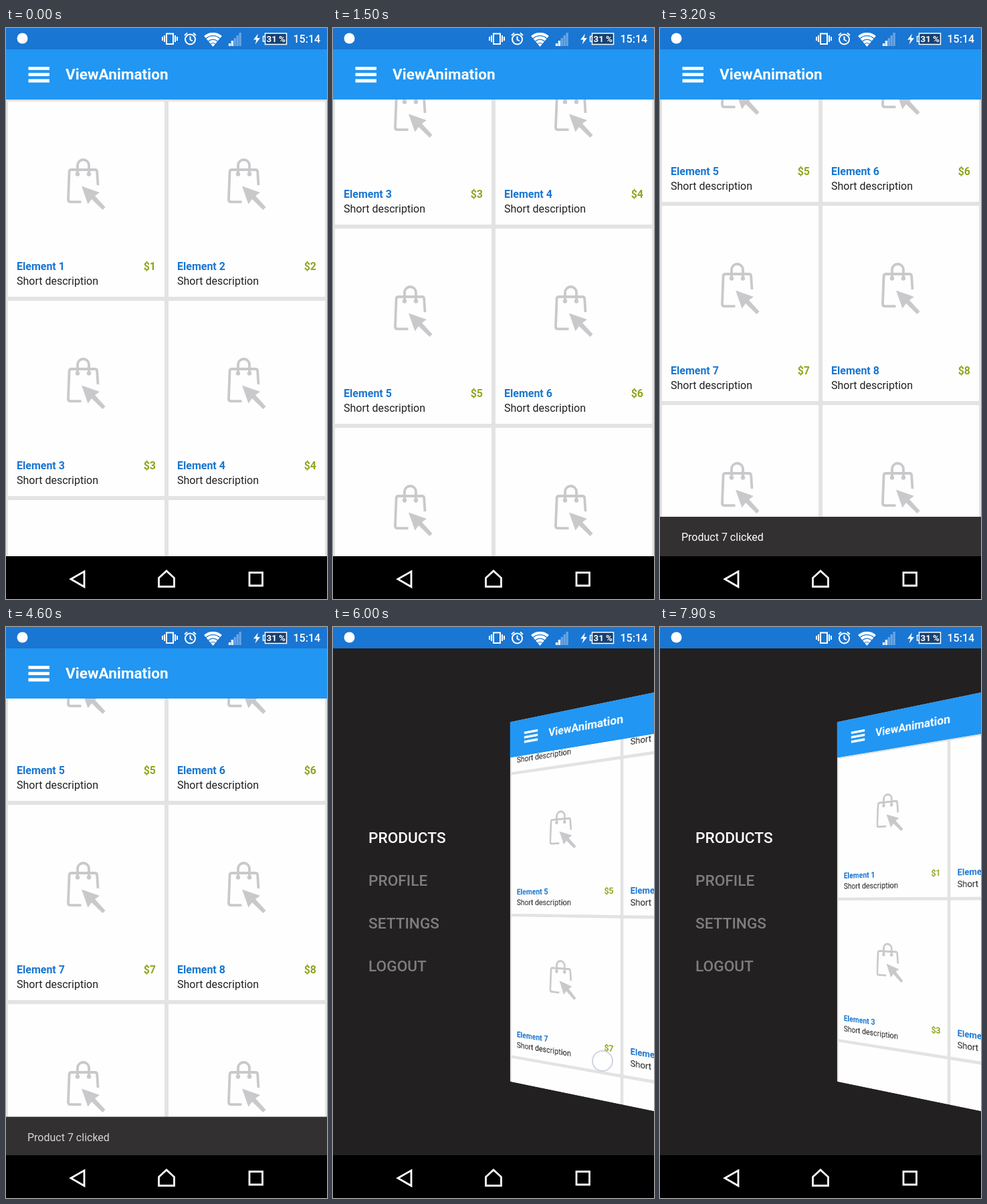
Write an HTML page that moves like this. It is 480x854 px and loops after 8000 ms.

```html
<!DOCTYPE html>
<html lang="en">
<head>
<meta charset="utf-8">
<title>Drawer demo</title>
<style>
@property --open { syntax: "<number>"; inherits: false; initial-value: 0; }

html, body { margin: 0; width: 100%; height: 100%; overflow: hidden; background: #222021; }
#stage {
  --t: 0;
  position: relative; width: 480px; height: 854px; overflow: hidden;
  background: #222021; font: 16px/20px Roboto, sans-serif; color: #212121;
}
#stage * { box-sizing: border-box; }
#stage div, #stage svg { position: absolute; }

/* All motion is scrubbed through --t (milliseconds into the loop). */
.page, .list, .snack, .snack span, .finger, .finger i {
  animation: 8s linear calc(var(--t) * -1ms) infinite paused both;
}

.status { inset: 0 0 auto; height: 32px; background: #1976d2; }
.nav { inset: 790px 0 0; background: #000; }

.menu { left: 53px; top: 284px; font: 500 22.67px/64px Roboto, sans-serif; color: #7f7e7f; }
.menu p { margin: 0; }
.menu p:first-child { color: #fff; }

.page {
  left: 0; top: 32px; width: 480px; height: 758px; overflow: hidden; background: #e3e3e4;
  transform: translateX(calc(var(--open) * 192px)) perspective(286px)
    rotateY(calc(var(--open) * -11deg)) scale(calc(1 - var(--open) * .2));
  animation-name: open;
}
.bar { inset: 0 0 auto; height: 75px; background: #2196f3; }
.title { left: 89px; top: 23px; font: 700 22.6px/30px Roboto, sans-serif; color: #fff; }

.list { left: 0; top: 75px; width: 480px; animation-name: scroll; }
.cell { width: 240px; height: 298px; }
.card { inset: 2.67px; background: #fefefe; border-radius: 1px; }
.cell svg { left: 0; top: 0; }
.name, .price { top: 240px; font-weight: 700; }
.name { left: 16px; color: #1976d2; }
.price { right: 16px; color: #8fa61e; }
.desc { left: 16px; top: 262px; white-space: nowrap; }

.snack {
  left: 0; top: 731px; width: 480px; height: 59px; padding-left: 32px;
  background: #323031; color: #fff; line-height: 61px; animation-name: snack;
}
.snack span { animation-name: snack-text; }

.finger { left: -16px; top: -16px; width: 32px; height: 32px; animation-name: drag; }
.finger i {
  display: block; height: 100%; border-radius: 50%;
  border: 2.5px solid rgba(200, 205, 220, .85); background: rgba(255, 255, 255, .55);
  animation-name: touch; animation-timing-function: step-end;
}

@keyframes open {
  0%, 60% { --open: 0; }
  61.25% { --open: .513; }
  62.5% { --open: .91; }
  63.75%, 100% { --open: 1; }
}
@keyframes scroll {
  0%, 5% { transform: translateY(0); }
  6.25% { transform: translateY(-20px); }
  7.5% { transform: translateY(-95px); }
  8.75% { transform: translateY(-215px); }
  10% { transform: translateY(-330px); }
  11.25% { transform: translateY(-396px); animation-timing-function: ease-out; }
  16.25%, 20% { transform: translateY(-406px); }
  21.25% { transform: translateY(-415px); }
  22.5% { transform: translateY(-500px); }
  23.75% { transform: translateY(-650px); }
  25% { transform: translateY(-732px); animation-timing-function: ease-out; }
  31.25%, 71.25% { transform: translateY(-738px); }
  72.5% { transform: translateY(-730px); }
  73.75% { transform: translateY(-660px); }
  75% { transform: translateY(-562px); }
  76.25% { transform: translateY(-490px); animation-timing-function: ease-out; }
  82.5% { transform: translateY(-380px); }
  83.75% { transform: translateY(-370px); }
  85% { transform: translateY(-300px); }
  86.25% { transform: translateY(-180px); }
  87.5% { transform: translateY(-70px); }
  88.75% { transform: translateY(-15px); }
  90%, 100% { transform: translateY(0); }
}
@keyframes drag {
  0%, 6.25% { transform: translate(276px, 600px); }
  7.5% { transform: translate(274px, 521px); }
  8.75% { transform: translate(272px, 401px); }
  10% { transform: translate(270px, 286px); }
  11.25%, 12.4% { transform: translate(270px, 220px); }
  21.25% { transform: translate(276px, 542px); }
  22.5% { transform: translate(274px, 455px); }
  23.75% { transform: translate(272px, 305px); }
  25%, 26.2% { transform: translate(271px, 223px); }
  72.5% { transform: translate(396px, 480px); }
  73.75% { transform: translate(399px, 560px); }
  75% { transform: translate(403px, 649px); }
  76.25%, 77.4% { transform: translate(405px, 700px); }
  83.75% { transform: translate(400px, 350px); }
  87.5%, 100% { transform: translate(404px, 590px); }
}
@keyframes touch {
  0%, 12.5%, 26.25%, 77.5%, 88.75%, 100% { opacity: 0; }
  6.25%, 21.25%, 72.5%, 83.75% { opacity: 1; }
}
@keyframes snack {
  0%, 35.5% { transform: translateY(59px); animation-timing-function: cubic-bezier(.4, 0, .2, 1); }
  39.5%, 57% { transform: translateY(0); animation-timing-function: cubic-bezier(.4, 0, .2, 1); }
  62%, 100% { transform: translateY(59px); }
}
@keyframes snack-text {
  0%, 37% { opacity: 0; }
  40%, 57% { opacity: 1; }
  59.5%, 100% { opacity: 0; }
}
</style>
</head>
<body>
<div id="stage">
  <div class="menu"><p>PRODUCTS</p><p>PROFILE</p><p>SETTINGS</p><p>LOGOUT</p></div>

  <div class="page">
    <div class="list"></div>
    <div class="bar">
      <svg width="80" height="75" fill="#fff"><path d="M33.5 26h31.5v4.8h-31.5zM33.5 35.3h31.5v4.8h-31.5zM33.5 44.6h31.5v4.8h-31.5z"/></svg>
      <div class="title">ViewAnimation</div>
    </div>
  </div>

  <div class="snack"><span>Product 7 clicked</span></div>

  <div class="status">
    <svg width="480" height="32" fill="none" stroke="#fff" stroke-width="2">
      <circle cx="24.5" cy="15.5" r="8" fill="#fff" stroke="none"/>
      <path d="M240 8.5h10v15.5h-10zM237 11v10M253 11v10M234 13v6M256 13v6"/>
      <circle cx="275.500" cy="17" r="7.5"/>
      <path d="M275.500 12.500v5l3.500 2M267 11l4-3.500M284 11l-4-3.500"/>
      <clipPath id="fan"><path d="M309.500 28L292 7h35z"/></clipPath>
      <g clip-path="url(#fan)" stroke-width="4.2">
        <circle cx="309.500" cy="27" r="18"/><circle cx="309.500" cy="27" r="12.600"/>
        <circle cx="309.500" cy="27" r="7.200"/><circle cx="309.500" cy="27" r="2" />
      </g>
      <g stroke-width="3.300">
        <path d="M334.500 27v-4M338.400 27v-8"/>
        <path d="M342.300 27v-12M346.200 27v-16M350.100 27v-20" stroke-opacity=".35"/>
      </g>
      <path d="M377 8.500l-7 9h4.500l-2 7 7.500-9.500h-4.500z" fill="#fff" stroke="none"/>
      <path d="M387.500 8h32v16.500h-32z" fill="#17406f" stroke-width="1.500"/>
      <path d="M387 12.500h-2.500v7.500h2.500" stroke-width="1.500"/>
      <g fill="#fff" stroke="none" font-family="Roboto, sans-serif">
        <text x="389.500" y="21" font-size="13.300" font-weight="700">31 %</text>
        <text x="429.500" y="22" font-size="16" font-weight="500">15:14</text>
      </g>
    </svg>
  </div>

  <div class="nav">
    <svg width="480" height="64" fill="none" stroke="#fff" stroke-width="2.800">
      <path d="M97 34.300l20-11.500v23zM228.500 32.500l11.500-10.500 11.500 10.500v13h-23zM364 24.500h19.500v19.500h-19.500z"/>
    </svg>
  </div>

  <div class="finger"><i></i></div>
</div>

<svg width="0" height="0" style="position:absolute">
  <symbol id="bag" viewBox="0 107 240 298">
    <g fill="none" stroke="#c9c9cc" stroke-width="3.800" stroke-linejoin="round">
      <path d="M137.500 235l-1.300-20q-.2-3-3.200-3h-35q-3.200 0-3.400 3l-1.600 41.500q0 3.700 3.500 3.700h16"/>
      <path d="M107 218v-12.500a8.500 8.500 0 0 1 17 0v12.500"/>
    </g>
    <g fill="#c9c9cc">
      <circle cx="107" cy="218.500" r="3.200"/><circle cx="124" cy="218.500" r="3.200"/>
      <path d="M113 236.500l27 9.500-7 5 15.500 17-4 4-16.500-16-5.500 7.500z"/>
    </g>
  </symbol>
</svg>

<script>
const LOOP = 8000, STEP = 100;
const stage = document.getElementById('stage');

const cell = i => `
  <div class="cell" style="left:${i % 2 * 240}px;top:${(i >> 1) * 298}px">
    <div class="card"></div>
    <svg width="240" height="298"><use href="#bag"/></svg>
    <div class="name">Element ${i + 1}</div>
    <div class="price">$${i + 1}</div>
    <div class="desc">Short description</div>
  </div>`;
stage.querySelector('.list').innerHTML = Array.from({ length: 10 }, (_, i) => cell(i)).join('');

const start = performance.now();
function draw() {
  const t = (performance.now() - start + 5) % LOOP;
  stage.style.setProperty('--t', Math.floor(t / STEP) * STEP);
  requestAnimationFrame(draw);
}
draw();
</script>
</body>
</html>
```
